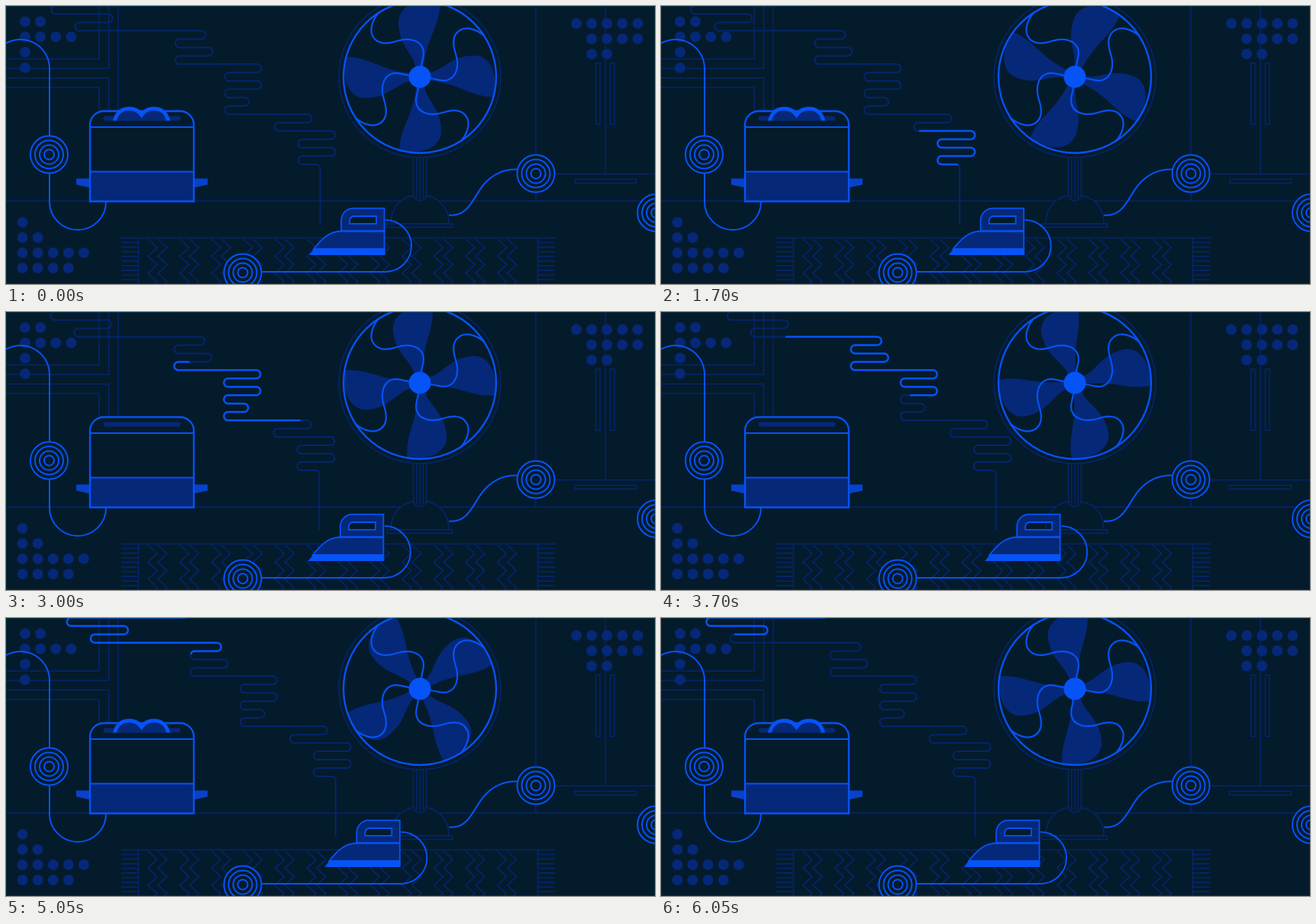
Write an HTML page with a canvas that moves like this. It is 850x365 px and loops after 6100 ms.

```html
<!DOCTYPE html>
<html lang="en">
<head>
<meta charset="utf-8">
<title>Appliances</title>
<style>
html, body { margin: 0; width: 100%; height: 100%; overflow: hidden; background: #041b2c; }
canvas { display: block; width: 850px; height: 365px; }
</style>
</head>
<body>
<canvas id="stage" width="850" height="365"></canvas>
<script>
const ctx = document.getElementById('stage').getContext('2d');
const LOOP = 6100;
const BG = '#041b2c', DIM = '#05256c', FILL = '#062878', MID = '#0841cc', BRIGHT = '#0653f6';
const TAU = Math.PI * 2;

function stroke(path, color, width) {
  ctx.strokeStyle = color;
  ctx.lineWidth = width;
  ctx.stroke(path);
}

function fill(path, color, rule) {
  ctx.fillStyle = color;
  ctx.fill(path, rule || 'nonzero');
}

function disc(x, y, r, color) {
  const p = new Path2D();
  p.arc(x, y, r, 0, TAU);
  fill(p, color);
}

function ring(x, y, r, color, width) {
  const p = new Path2D();
  p.arc(x, y, r, 0, TAU);
  stroke(p, color, width);
}

const ease = u => (1 - Math.cos(Math.PI * Math.min(1, Math.max(0, u)))) / 2;

// Eased moves between [time, value] keys
function tween(keys, t, curve) {
  if (t <= keys[0][0]) return keys[0][1];
  for (let i = 1; i < keys.length; i++) {
    const [t0, v0] = keys[i - 1], [t1, v1] = keys[i];
    if (t < t1) return v0 + (v1 - v0) * curve((t - t0) / (t1 - t0));
  }
  return keys[keys.length - 1][1];
}

const linear = u => u;
const IRON_X = [[636, 0], [2065, -24], [4318, 38], [5850, 0]];
const TOAST_Y = [[2230, 0], [2450, 24], [4300, 24], [4450, 0]];
const STEAM_HEAD = [[900, 0], [1700, 349], [3000, 912], [3700, 1173], [4800, 1530]];
const STEAM_TAIL = [[1380, 0], [1700, 79], [3000, 430], [3700, 624], [5050, 1000], [6100, 1241]];

// Static room lines
const pipes = new Path2D(
  'M122 0V69.5H0M134.5 0V82H0M0 94.5H134.5V137M0 107H122V137M147 0V137' +
  'M0 256H850M694 0V256M785 0V220M719 220.5H850' +
  'M772.5 75h5.5v80.5h-5.5zM791.5 75h5.5v80.5h-5.5zM745 227.5h80.5v5h-80.5z');

const rug = new Path2D('M150 304.5H720M173.5 304.5V365M696.5 304.5V365');
for (let y = 310.5; y < 365; y += 6.1) {
  rug.moveTo(151, y);
  rug.lineTo(173, y);
  rug.moveTo(697, y);
  rug.lineTo(719, y);
}
for (let g = 0; g < 12; g++) {
  for (let k = 0; k < 2; k++) {
    const x = 186 + g * 41.6 + k * 13;
    rug.moveTo(x, 306);
    for (let i = 1; i < 7; i++) rug.lineTo(x + (i % 2) * 12, 306 + i * 11.2);
  }
}

const DOTS = [
  [25, 20.5, 2], [25, 40.5, 4], [25, 60.5, 1], [25, 81, 1],
  [21.5, 284, 1], [21.5, 304, 2], [21.5, 324, 5], [21.5, 344, 4],
  [747, 23, 5], [767, 43, 4], [767, 63, 2]
];

const cords = new Path2D(
  'M0 49A38 38 0 0 1 57 82V170M57 220V257A37 37 0 0 0 131 257' +
  'M580 274.5C606 278 612 250 626 234C639 219 655 214 670 214.5');

function drawRoom() {
  stroke(pipes, DIM, 1.5);
  stroke(rug, DIM, 1.6);
  for (const [x, y, n] of DOTS)
    for (let i = 0; i < n; i++) disc(x + i * 20.1, y, 7, FILL);
}

function drawPlug(x, y) {
  disc(x, y, 25, BG);
  for (let r = 6.5; r < 25; r += 6) ring(x, y, r, BRIGHT, 2);
}

// Toaster
const shell = new Path2D('M110 256.5V156A18 18 0 0 1 128 138H228A18 18 0 0 1 246 156V256.5Z');
const seams = new Path2D('M110 159H246M110 217.5H246');
const levers = new Path2D('M92 226.5H110V238.5L92 234.5ZM246 226.5H264V234.5L246 238.5Z');
const slot = new Path2D('M130.5 144.5H225.5A3 3 0 0 1 225.5 150.5H130.5A3 3 0 0 1 130.5 144.5Z');
const toast = new Path2D('M141.5 156C143 142 150 134.8 161 134.8C168 134.8 174 138 177.5 143' +
  'C181 138 187 134.8 194 134.8C205 134.8 212 142 213.5 156');

function drawToaster(drop) {
  fill(levers, MID);
  fill(shell, BG);
  ctx.fillStyle = FILL;
  ctx.fillRect(110, 217, 136, 39);
  stroke(shell, BRIGHT, 2.4);
  stroke(seams, BRIGHT, 2.2);
  fill(slot, FILL);
  ctx.save();
  ctx.beginPath();
  ctx.rect(128, 120, 100, 30.5);
  ctx.clip();
  ctx.translate(0, drop);
  fill(toast, FILL);
  stroke(toast, BRIGHT, 5);
  ctx.restore();
}

// Fan
const dome = new Path2D('M504 286C504 264 518 248 542 248C566 248 580 264 580 286Z');
const pole = new Path2D('M533.5 198V247A8.5 8.5 0 0 0 550.5 247V198');
const ribs = new Path2D('M537.7 198V252M542 198V253M546.3 198V252');
const plate = new Path2D('M498.5 286H584.5V290.5H498.5Z');
const blade = new Path2D('M0 -6L14 -6C32 -10 42 -28 72 -28C93 -27 102 -5 98 26.5C68 27 52 9 14 5L0 6Z');
const wire = new Path2D('M-53 -85C-62 -76 -66 -62 -62 -54C-56 -42 -42 -43 -30 -47C-14 -52 0 -48 4 -37C7 -29 3 -24 2 -14');

function fourfold(draw) {
  for (let i = 0; i < 4; i++) {
    draw();
    ctx.rotate(Math.PI / 2);
  }
}

function drawFan(t) {
  fill(dome, BG);
  stroke(dome, DIM, 1.6);
  stroke(plate, DIM, 1.6);
  fill(pole, BG);
  stroke(pole, DIM, 1.6);
  stroke(ribs, DIM, 1.4);
  ctx.save();
  ctx.translate(542, 93);
  ring(0, 0, 106, DIM, 1.6);
  ctx.save();
  ctx.rotate(2 * TAU * t / LOOP);
  fourfold(() => fill(blade, FILL));
  ctx.restore();
  fourfold(() => stroke(wire, BRIGHT, 2.2));
  ring(0, 0, 100, BRIGHT, 2.4);
  disc(0, 0, 14.5, BRIGHT);
  ctx.restore();
}

// Steam: rows of alternating direction joined by half circles
const TURNS = [388, 426, 388, 426, 357, 395, 292, 313, 292, 329,
  292, 329, 227, 265, 227, 256, 96, 134, 65];
const steam = new Path2D('M411.5 287V213A5 5 0 0 0 406.5 208');
TURNS.forEach((x, i) => {
  const gap = 10.97, y = 208 - i * gap, up = Math.PI / 2;
  steam.lineTo(x, y);
  steam.arc(x, y - gap / 2, gap / 2, up, i % 2 ? -up : 3 * up, i % 2 === 1);
});
steam.lineTo(215, -0.4);

function drawSteam(t) {
  stroke(steam, DIM, 2);
  const tail = tween(STEAM_TAIL, t, linear);
  const size = tween(STEAM_HEAD, t, linear) - tail;
  if (size <= 0) return;
  ctx.setLineDash([size, 4000]);
  ctx.lineDashOffset = -tail;
  stroke(steam, BRIGHT, 2.5);
  ctx.setLineDash([]);
}

// Iron
const body = new Path2D('M403 319C414 305 424 295.5 440 295.5H495.5V319Z');
const sole = new Path2D('M397 327L404 318H496.5V327Z');
const grip = new Path2D('M439 295.5V282A16 16 0 0 1 455 265.7H495.5V295.5Z' +
  'M450 285.8V282A6 6 0 0 1 456 276H485V285.8Z');

function drawIron(x) {
  const cord = new Path2D();
  cord.moveTo(335, 349);
  cord.lineTo(497 + x, 349);
  cord.arc(497 + x, 315, 34, Math.PI / 2, -Math.PI / 2, true);
  stroke(cord, BRIGHT, 2);
  ctx.save();
  ctx.translate(x, 0);
  fill(grip, FILL, 'evenodd');
  fill(body, FILL);
  stroke(grip, BRIGHT, 1.8);
  stroke(body, BRIGHT, 1.8);
  fill(sole, BRIGHT);
  ctx.restore();
}

function draw(t) {
  ctx.fillStyle = BG;
  ctx.fillRect(0, 0, 850, 365);
  drawRoom();
  const x = tween(IRON_X, t, ease);
  drawFan(t);
  ctx.save();
  ctx.translate(x, 0);
  drawSteam(t);
  ctx.restore();
  stroke(cords, BRIGHT, 2);
  drawToaster(tween(TOAST_Y, t, ease));
  drawIron(x);
  drawPlug(56.5, 195);
  drawPlug(694, 220);
  drawPlug(310, 350);
  drawPlug(851.5, 271.5);
  ctx.strokeStyle = 'rgba(20, 90, 90, 0.3)';
  ctx.lineWidth = 1;
  ctx.strokeRect(0.5, 0.5, 849, 364);
}

const start = performance.now();
function frame() {
  const t = (performance.now() - start) % LOOP;
  draw(Math.floor(t / 50) * 50);
  requestAnimationFrame(frame);
}
frame();
</script>
</body>
</html>
```
